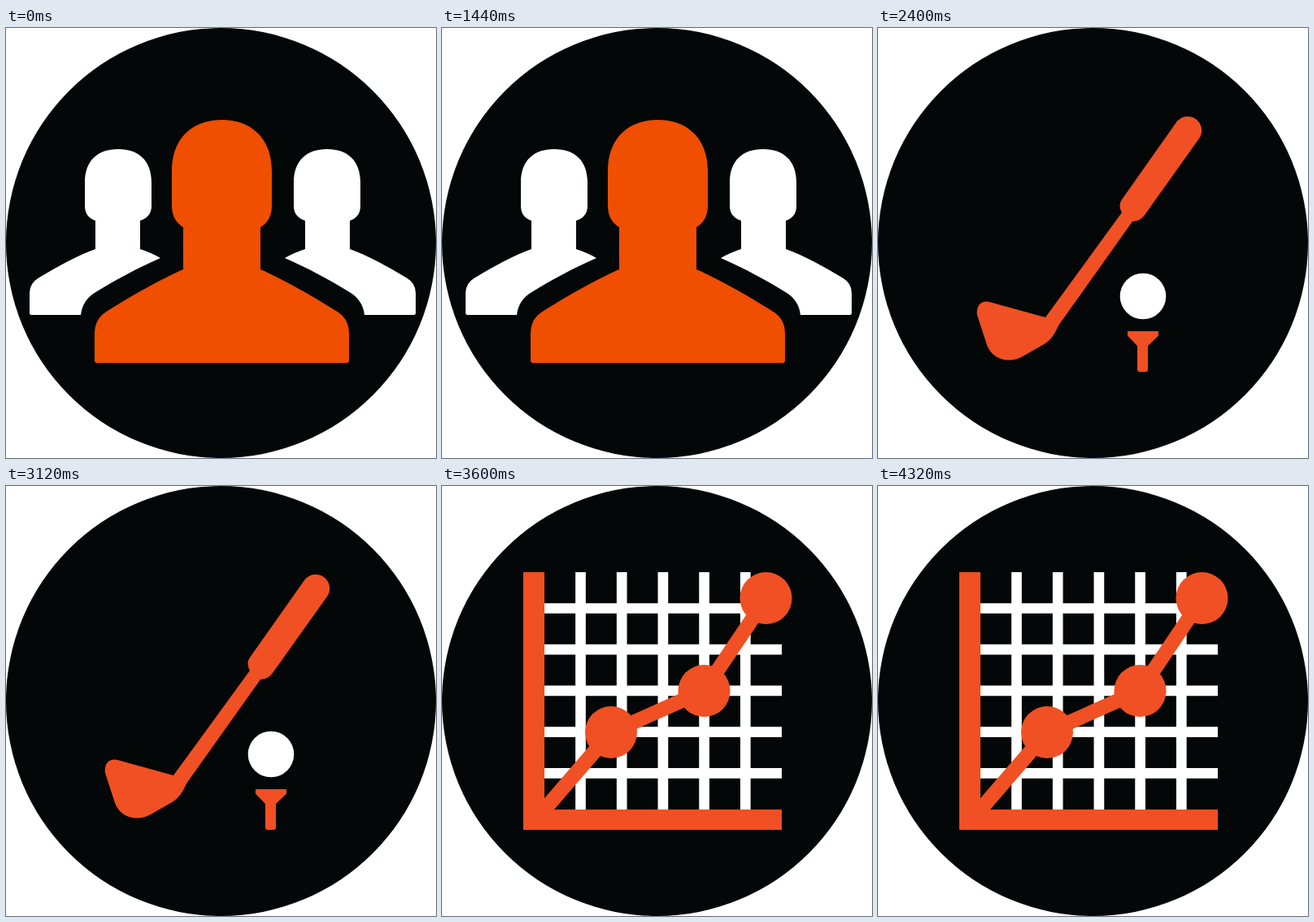
Write an HTML page that moves like this. It is 529 px wide and 529 px high and loops after 4.8 s.

```html
<!DOCTYPE html>
<html lang="en">
<head>
<meta charset="utf-8">
<title>Icon cycle</title>
<style>
  html, body { margin: 0; width: 100%; height: 100%; overflow: hidden; background: #fff; }
  svg { display: block; width: 100vw; height: 100vh; }
  .scene { visibility: hidden; animation: 4800ms step-end infinite; }
  .team { animation-name: team; }
  .golf { animation-name: golf; }
  .chart { animation-name: chart; }
  @keyframes team { 0% { visibility: visible; } 50%, 100% { visibility: hidden; } }
  @keyframes golf { 0% { visibility: hidden; } 50% { visibility: visible; } 75%, 100% { visibility: hidden; } }
  @keyframes chart { 0% { visibility: hidden; } 75%, 100% { visibility: visible; } }
</style>
</head>
<body>
<svg viewBox="0 0 529 529">
  <circle cx="264.5" cy="264.5" r="264.5" fill="#040707"/>

  <g class="scene team" fill="#fff">
    <path id="side" d="M31.500 353 Q29 353 29 350.500 V326 Q29 314 40 307.500 C62 294 90 279 110 272 V237
      Q97 232.500 97 219 V190 C97 163 113 149 138 149 S179 163 179 190 V219 Q179 232.500 165 237 V272
      Q179 276.500 190 283 C162 295 133 311 112 324 Q94 334 92 353 Z"/>
    <use href="#side" transform="matrix(-1 0 0 1 533 0)"/>
    <path fill="#f04e00" d="M112 412 Q109 412 109 409 V376 Q109 357 125 348 C152 331 190 309 218 297 V245
      Q204 237 204 218 V176 C204 135 230 113 265.500 113 S327 135 327 176 V218 Q327 237 313 245 V297
      C341 309 379 331 406 348 Q422 357 422 376 V409 Q422 412 419 412 Z"/>
  </g>

  <g class="scene golf" fill="#f05023">
    <path d="M367 116 A17 17 0 0 1 395 136 L328 230 Q322 238 313 238 L222 366 Q216 381 206 388 L178 404
      Q167 410 155 408 Q140 405 134 390 L122 353 Q121 348 123 343 Q127 335 137 337 L206 356 L300 227
      Q295 218 300 211 Z"/>
    <circle cx="326" cy="330" r="28.300" fill="#fff"/>
    <path d="M307 373 H345 V378.500 L332 391 V420 Q332 423 329 423 H322 Q319 423 319 420 V391 L307 378.500 Z"/>
  </g>

  <g class="scene chart" fill="#f05023">
    <path stroke="#fff" stroke-width="12.700" d="M170.500 106 v292 m50.700 0 v-292 m50.700 0 v292 m50.700 0 v-292 m50.700 0 v292
      M126 150.500 h292 m0 50.700 h-292 m0 50.700 h292 m0 50.700 h-292 m0 50.700 h292"/>
    <path d="M100 106 H126 V398 H418 V423 H100 Z"/>
    <path fill="none" stroke="#f05023" stroke-width="18" d="M126 398 L208 303 L322 252 L399 138"/>
    <circle cx="208" cy="303" r="32"/>
    <circle cx="322.500" cy="252" r="32"/>
    <circle cx="398.500" cy="138" r="32"/>
  </g>
</svg>
</body>
</html>
```
